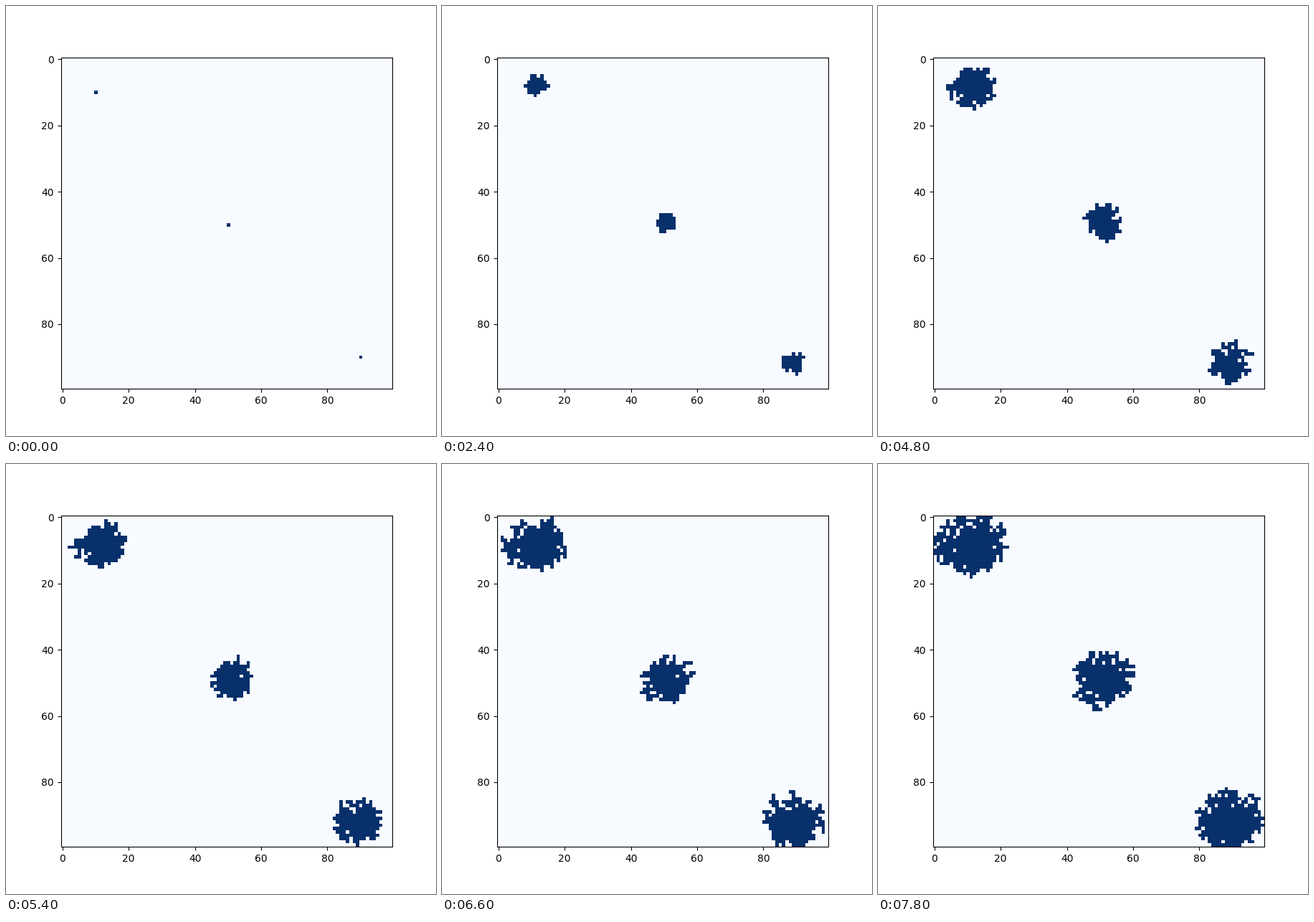
Write a matplotlib script that moves like this. It is 600x600 px and loops after 8000 ms.

```python
import numpy as np
import matplotlib.pyplot as plt
from matplotlib.animation import FuncAnimation

SIZE = 100
STEPS = 27
TICKS_PER_STEP = 3
SETTLE_STEPS = 8

# Seed cell, centre the cluster drifts to, width and height relative to a disc
CLUSTERS = [
    ((10, 10), (11.2, 8.2), (1.2, 0.98)),
    ((50, 50), (50.7, 49.2), (1.0, 0.97)),
    ((90, 90), (89.0, 91.8), (1.08, 1.0)),
]

rng = np.random.default_rng(7)
rows, cols = np.mgrid[:SIZE, :SIZE]
# Cells yield to the growing front at their own depth; a few resist far longer
depth = rng.uniform(0.68, 1.14, (SIZE, SIZE))
depth[rng.random((SIZE, SIZE)) < 0.11] *= 0.5


def reachable(step):
    """Cells that the clusters may occupy at this step."""
    radius = 0.7 + 0.36 * step
    settle = min(step / SETTLE_STEPS, 1)
    allowed = np.zeros((SIZE, SIZE), bool)
    for seed, centre, (width, height) in CLUSTERS:
        cx, cy = (s + (c - s) * settle for s, c in zip(seed, centre))
        distance = np.hypot((cols - cx) / width, (rows - cy) / height)
        allowed |= distance <= radius * depth
    return allowed


def touching(grid):
    """The grid together with its four-way neighbours."""
    p = np.pad(grid, 1)
    return grid | p[:-2, 1:-1] | p[2:, 1:-1] | p[1:-1, :-2] | p[1:-1, 2:]


def grow():
    grid = np.zeros((SIZE, SIZE), bool)
    for (x, y), *_ in CLUSTERS:
        grid[y, x] = True
    history = [grid]
    for step in range(1, STEPS):
        allowed = reachable(step)
        for _ in range(2):
            grid = grid | (touching(grid) & allowed)
        history.append(grid)
    return history


history = grow()
fig, ax = plt.subplots(figsize=(6, 6), dpi=100)
image = ax.imshow(history[0].astype(float), cmap="Blues", vmin=0, vmax=1)


def update(tick):
    image.set_data(history[tick // TICKS_PER_STEP].astype(float))
    return [image]


anim = FuncAnimation(fig, update, frames=80, interval=100, repeat=True, repeat_delay=0)
plt.show()
```
